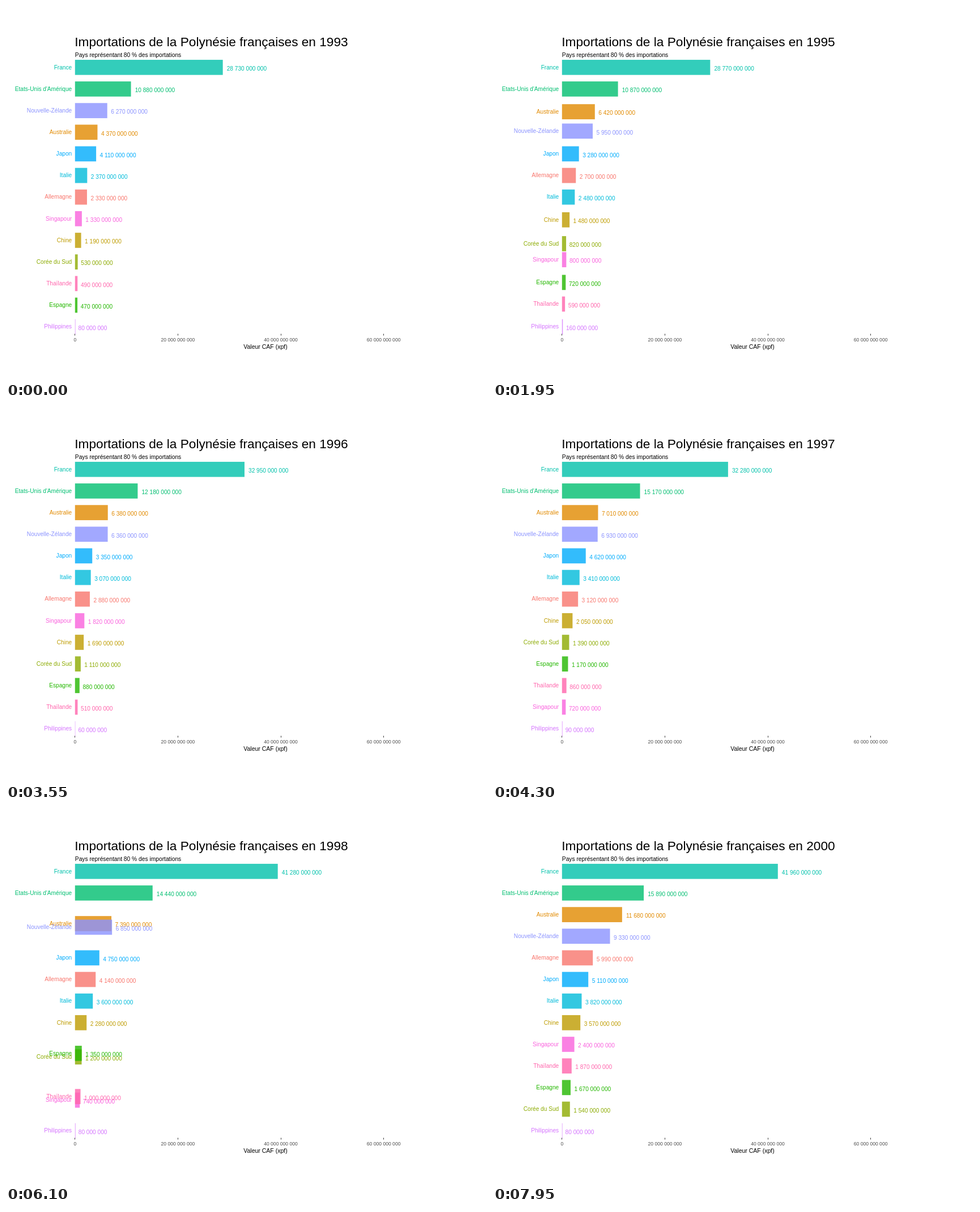
An HTML page for the animation above (8 s loop, 849 by 660 pixels).

```html
<!DOCTYPE html>
<html lang="fr">
<head>
<meta charset="utf-8">
<title>Importations</title>
<style>
  html, body { margin: 0; width: 100%; height: 100%; overflow: hidden; background: #fff; }
  svg { display: block; width: 849px; height: 660px; font-family: "Liberation Sans", Arial, sans-serif; }
</style>
</head>
<body>
<svg id="chart" viewBox="0 0 849 660"></svg>
<script>
const LOOP = 8000, STEP = 50;
const FIRST_MOVE = 200, PERIOD = 1100, MOVE = 850;
const FIRST_YEAR = 1993;
const X0 = 121.8, PX_PER_BILLION = 9.08;
const ROW_Y = 108.3, ROW_GAP = 38.15, BAR_HEIGHT = 26.7;
const LABEL_SIZE = 10.15;

// One value per year, in units of ten million francs.
const countries = [
  ["Allemagne", "#F8766D", [233, 257, 270, 288, 312, 414, 384, 599]],
  ["Australie", "#E18A00", [437, 578, 642, 638, 701, 739, 664, 1168]],
  ["Chine", "#BE9C00", [119, 125, 148, 169, 205, 228, 221, 357]],
  ["Corée du Sud", "#8CAB00", [53, 43, 82, 111, 139, 120, 142, 154]],
  ["Espagne", "#24B700", [47, 64, 72, 88, 117, 135, 127, 167]],
  ["Etats-Unis d'Amérique", "#00BE70", [1088, 1110, 1087, 1218, 1517, 1444, 1598, 1589]],
  ["France", "#00C1AB", [2873, 2943, 2877, 3295, 3228, 4128, 3681, 4196]],
  ["Italie", "#00BBDA", [237, 254, 248, 307, 341, 360, 327, 382]],
  ["Japon", "#00ACFC", [411, 348, 328, 335, 462, 475, 471, 511]],
  ["Nouvelle-Zélande", "#8B93FF", [627, 634, 595, 636, 693, 685, 768, 933]],
  ["Philippines", "#D575FE", [8, 14, 16, 6, 9, 8, 12, 8]],
  ["Singapour", "#F962DD", [133, 140, 80, 182, 72, 74, 118, 240]],
  ["Thaïlande", "#FF65AC", [49, 50, 59, 51, 86, 100, 118, 187]]
].map(([name, color, values]) => ({ name, color, values }));

const lastState = countries[0].values.length - 1;

for (let s = 0; s <= lastState; s++) {
  [...countries]
    .sort((a, b) => b.values[s] - a.values[s])
    .forEach((c, rank) => (c.ranks ??= [])[s] = rank);
}

const svg = document.getElementById("chart");

function add(tag, attrs, content = "") {
  const el = document.createElementNS("http://www.w3.org/2000/svg", tag);
  for (const key in attrs) el.setAttribute(key, attrs[key]);
  el.textContent = content;
  svg.append(el);
  return el;
}

function addText(x, y, size, content, fill = "#000", anchor = "start") {
  return add("text", { x, y, "font-size": size, fill, "text-anchor": anchor }, content);
}

const grouped = n => String(n).replace(/\B(?=(\d{3})+$)/g, " ");
const widthOf = s => [...s].reduce((w, ch) => w + (ch === " " ? 0.278 : 0.556), 0) * LABEL_SIZE;
const ease = p => p < 0.5 ? 4 * p ** 3 : 1 - 4 * (1 - p) ** 3;
const mix = (a, b, k) => a + (b - a) * k;

const title = addText(X0 - 0.5, 71, 22.67, "");
addText(X0, 90, 10.25, "Pays représentant 80 % des importations");
addText(458, 605, 10.5, "Valeur CAF (xpf)", "#000", "middle");

for (let billions = 0; billions <= 60; billions += 20) {
  const x = X0 + billions * PX_PER_BILLION;
  add("rect", { x: Math.floor(x), y: 578.5, width: 1, height: 3, fill: "#333" });
  addText(x, 592, 8.6, grouped(billions * 1e9), "#4D4D4D", "middle");
}

for (const c of countries) {
  c.bar = add("rect", { x: X0, height: BAR_HEIGHT, fill: c.color, "fill-opacity": 0.8 });
}
for (const c of countries) {
  c.label = addText(116.2, 0, LABEL_SIZE, c.name, c.color, "end");
  c.amount = addText(0, 0, LABEL_SIZE, "", c.color);
}

function draw(ms) {
  const t = Math.floor((ms % LOOP) / STEP + 1e-6) * STEP;
  const from = Math.min(lastState - 1, Math.max(0, Math.floor((t - FIRST_MOVE) / PERIOD)));
  const p = Math.min(1, Math.max(0, (t - FIRST_MOVE - from * PERIOD) / MOVE));
  const k = ease(p);
  const nearest = p < 0.5 ? from : from + 1;

  title.textContent = `Importations de la Polynésie françaises en ${FIRST_YEAR + nearest}`;
  for (const { values, ranks, bar, label, amount } of countries) {
    const y = ROW_Y + ROW_GAP * mix(ranks[from], ranks[from + 1], k);
    const width = mix(values[from], values[from + 1], k) / 100 * PX_PER_BILLION;
    const text = grouped(values[nearest] * 1e7);
    bar.setAttribute("y", y - BAR_HEIGHT / 2);
    bar.setAttribute("width", width);
    label.setAttribute("y", Math.round(y + 3.2));
    amount.setAttribute("x", X0 + width + widthOf(text) * 0.1);
    amount.setAttribute("y", Math.round(y + 5.8));
    amount.textContent = text;
  }
}

const start = performance.now();
function tick() {
  draw(performance.now() - start);
  requestAnimationFrame(tick);
}
tick();
</script>
</body>
</html>
```
